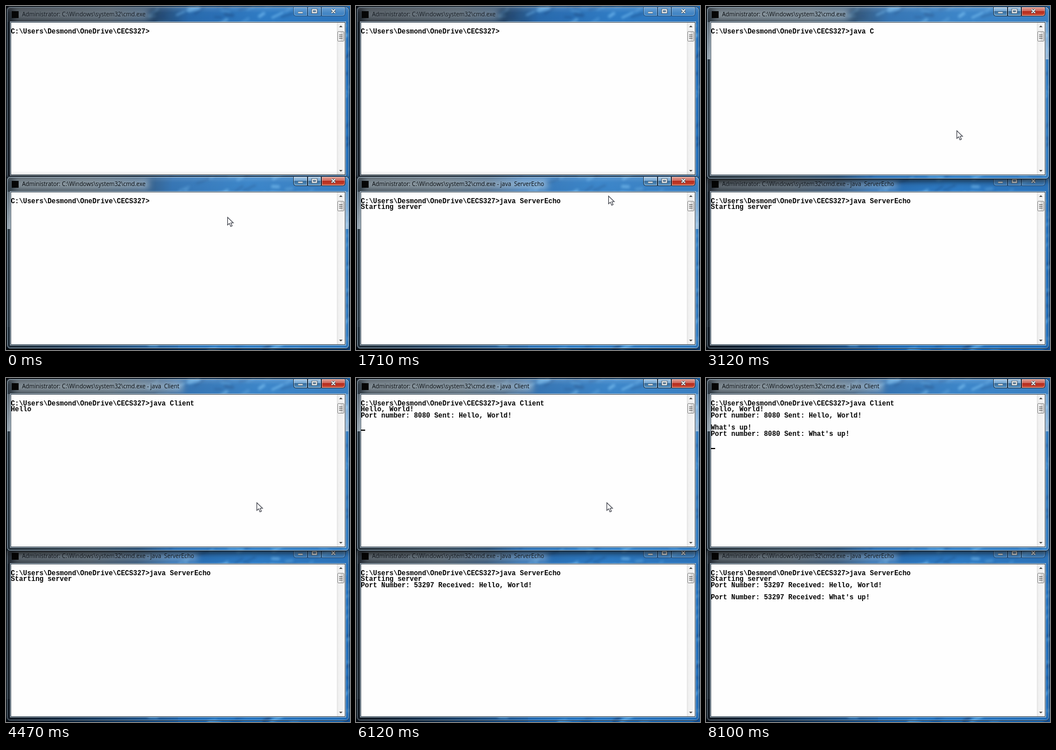
These frames come from a looping animation (600x600 px, 8.13 s). An HTML page with a canvas:

```html
<!DOCTYPE html>
<html lang="en">
<head>
<meta charset="utf-8">
<title>Echo server and client</title>
<style>
  html, body { margin: 0; width: 100%; height: 100%; overflow: hidden; background: #0b1a2c; }
  canvas { display: block; width: 600px; height: 600px; }
</style>
</head>
<body>
<canvas id="stage" width="600" height="600"></canvas>
<script>
const LOOP = 8130;
const ctx = document.getElementById('stage').getContext('2d');
const PROMPT = 'C:\\Users\\Desmond\\OneDrive\\CECS327>';
const TITLE = 'Administrator: C:\\Windows\\system32\\cmd.exe';
const CELL = 7.11, LINE = 10.67, OFFSET = 296;
const CLICK = 2160;

const clamp = v => Math.max(0, Math.min(1, v));
const typed = (t, from, to, s) => s.slice(0, Math.floor(clamp((t - from) / (to - from)) * s.length));

function gradient(c, x0, y0, x1, y1, stops) {
  const g = c.createLinearGradient(x0, y0, x1, y1);
  for (const [at, color] of stops) g.addColorStop(at, color);
  return g;
}

function roundPath(c, x, y, w, h, r) {
  c.beginPath();
  c.roundRect(x, y, w, h, r);
}

// Desktop picture: dark on the left, streaked blue on the right
function makeDesktop() {
  const cv = document.createElement('canvas');
  cv.width = cv.height = 600;
  const c = cv.getContext('2d');
  c.fillStyle = gradient(c, 0, 0, 600, 60, [
    [0, '#05080d'], [.12, '#12181e'], [.3, '#202d39'], [.43, '#0f3054'],
    [.53, '#1259a3'], [.75, '#196fc0'], [1, '#1766b4']]);
  c.fillRect(0, 0, 600, 600);
  c.fillStyle = gradient(c, 0, 585, 300, 585, [
    [0, '#03070c'], [.3, '#06192e'], [1, '#14589e']]);
  c.fillRect(0, 560, 300, 40);

  let seed = 71;
  const rnd = () => (seed = (seed * 16807) % 2147483647) / 2147483647;
  c.filter = 'blur(2px)';
  c.lineCap = 'round';
  for (let i = 0; i < 520; i++) {
    const x = 240 + rnd() * 380, y = rnd() * 600, len = 5 + rnd() * 16;
    const light = rnd() > .4;
    c.strokeStyle = light ? `rgba(115,195,250,${.2 + rnd() * .5})` : `rgba(3,45,105,${.3 + rnd() * .4})`;
    c.lineWidth = 2 + rnd() * 4;
    c.beginPath();
    c.moveTo(x, y);
    c.lineTo(x + len, y - len * (rnd() - .2));
    c.stroke();
  }
  return cv;
}
const desktop = makeDesktop();

function glass(dy, active) {
  ctx.save();
  if (active) {
    ctx.shadowColor = 'rgba(0,0,0,.8)';
    ctx.shadowBlur = 12;
    ctx.shadowOffsetY = 3;
  }
  roundPath(ctx, 1, 1, 598, 301, 6);
  ctx.fillStyle = '#12314f';
  ctx.fill();
  ctx.restore();

  ctx.save();
  roundPath(ctx, 1, 1, 598, 301, 6);
  ctx.clip();
  ctx.drawImage(desktop, 0, -dy);
  ctx.fillStyle = active ? 'rgba(150,195,225,.2)' : 'rgba(130,170,200,.1)';
  ctx.fillRect(0, 0, 600, 303);
  ctx.fillStyle = gradient(ctx, 0, 1, 0, 28, [
    [0, 'rgba(255,255,255,.2)'], [.4, 'rgba(255,255,255,.06)'], [1, 'rgba(255,255,255,.04)']]);
  ctx.fillRect(0, 0, 600, 28);
  if (active) {
    ctx.fillStyle = gradient(ctx, 0, 28, 0, 93, [
      [0, 'rgba(225,238,248,.3)'], [1, 'rgba(225,238,248,.6)']]);
    ctx.fillRect(0, 28, 8, 65);
    ctx.fillRect(592, 28, 8, 65);
  }
  ctx.restore();

  roundPath(ctx, 1.5, 1.5, 597, 300, 6);
  ctx.strokeStyle = active ? '#101820' : '#28343e';
  ctx.lineWidth = 1;
  ctx.stroke();
  roundPath(ctx, 2.5, 2.5, 595, 298, 5);
  ctx.strokeStyle = `rgba(215,238,255,${active ? .65 : .4})`;
  ctx.stroke();
}

function titleBar(text, active) {
  ctx.font = '10px "Open Sans", "Noto Sans", sans-serif';
  const w = ctx.measureText(text).width;
  ctx.save();
  ctx.beginPath();
  ctx.rect(3, 3, 497, 24);
  ctx.clip();
  ctx.filter = 'blur(6px)';
  ctx.fillStyle = `rgba(225,235,242,${active ? .5 : .36})`;
  ctx.fillRect(14, 6, w + 20, 18);
  ctx.restore();
  ctx.fillStyle = '#050505';
  ctx.fillRect(10, 9, 12, 12);
  ctx.fillStyle = active ? '#05090d' : '#141a20';
  ctx.fillText(text, 28, 18);
}

function buttons(active) {
  const tint = active
    ? [[0, 'rgba(225,238,248,.65)'], [.48, 'rgba(165,195,218,.5)'], [.5, 'rgba(45,85,120,.55)'], [1, 'rgba(120,175,210,.6)']]
    : [[0, 'rgba(205,228,245,.28)'], [1, 'rgba(135,185,220,.16)']];
  const red = [[0, '#e5aaa0'], [.46, '#cf675a'], [.5, '#b52a1c'], [.8, '#c2402c'], [1, '#e38b70']];
  const boxes = [[501, 25, [0, 0, 0, 4]], [526, 24, 0], [550, 42, [0, 0, 4, 0]]];
  boxes.forEach(([x, w, r], i) => {
    roundPath(ctx, x + .5, 1.5, w - 1, 16, r);
    ctx.fillStyle = gradient(ctx, 0, 1, 0, 18, active && i === 2 ? red : tint);
    ctx.fill();
    ctx.strokeStyle = active ? 'rgba(15,28,42,.8)' : 'rgba(20,40,62,.5)';
    ctx.lineWidth = 1;
    ctx.stroke();
    roundPath(ctx, x + 1.5, 2.5, w - 3, 14, r);
    ctx.strokeStyle = `rgba(255,255,255,${active ? .4 : .25})`;
    ctx.stroke();
  });

  const glyphs = new Path2D('M509.5 11.5h8M534.5 6.5h7v5h-7zM568 6l6 6M574 6l-6 6');
  for (const [color, width] of [['#3c4854', 3.6], ['#f6fafc', 1.8]]) {
    ctx.strokeStyle = color;
    ctx.lineWidth = width;
    ctx.stroke(glyphs);
  }
}

function triangle(x, y, d) {
  ctx.beginPath();
  ctx.moveTo(x - 3, y + d);
  ctx.lineTo(x + 3, y + d);
  ctx.lineTo(x, y - 2 * d);
  ctx.fill();
}

function scrollBar() {
  ctx.fillStyle = gradient(ctx, 577, 0, 591, 0, [[0, '#e4e4e4'], [.25, '#f1f1f1'], [1, '#f6f6f6']]);
  ctx.fillRect(577, 29, 14, 265);
  ctx.fillStyle = '#484848';
  triangle(584, 36, 1);
  triangle(584, 287, -1);
  roundPath(ctx, 578.5, 44.5, 11, 17, 1.5);
  ctx.fillStyle = gradient(ctx, 578, 0, 590, 0, [[0, '#f7f7f7'], [.5, '#e6e6e6'], [.52, '#d4d4d4'], [1, '#dcdcdc']]);
  ctx.fill();
  ctx.strokeStyle = '#909090';
  ctx.lineWidth = 1;
  ctx.stroke();
  ctx.fillStyle = '#555';
  for (const y of [50, 53, 56]) ctx.fillRect(581, y, 6, 1);
}

function consoleText(lines, caret) {
  ctx.font = 'bold 11.85px "Liberation Mono", "DejaVu Sans Mono", monospace';
  ctx.fillStyle = '#000';
  lines.forEach((line, row) => {
    [...line].forEach((ch, col) => ctx.fillText(ch, 8.5 + col * CELL, 47.7 + row * LINE));
  });
  if (caret) {
    const row = lines.length - 1;
    ctx.fillRect(8.5 + lines[row].length * CELL, Math.round(46.9 + row * LINE), 7.5, 2);
  }
}

function drawWindow(dy, win, active) {
  ctx.save();
  ctx.translate(0, dy);
  glass(dy, active);
  titleBar(win.title, active);
  buttons(active);
  ctx.fillStyle = 'rgba(220,236,248,.75)';
  ctx.fillRect(7, 27, 586, 269);
  ctx.fillStyle = '#35434f';
  ctx.fillRect(8, 28, 584, 267);
  ctx.fillStyle = '#fefefe';
  ctx.fillRect(9, 29, 582, 265);
  scrollBar();
  consoleText(win.lines, active && win.caret);
  ctx.restore();
}

function server(t) {
  const running = t >= 1380;
  const lines = [PROMPT + typed(t, 270, 1230, 'java ServerEcho')];
  if (running) lines.push('Starting server');
  if (t >= 5970) lines.push('Port Number: 53297 Received: Hello, World!', '');
  if (t >= 7590) lines.push('Port Number: 53297 Received: What\'s up!');
  return {
    title: TITLE + (running ? ' - java  ServerEcho' : ''),
    lines,
    caret: (t + 1010) % 1060 < 530
  };
}

function client(t) {
  const running = t >= 3780;
  const lines = [PROMPT + typed(t, 2500, 3620, 'java Client')];
  if (running) lines.push(typed(t, 4000, 4400, 'Hello') + typed(t, 4740, 5780, ', World!'));
  if (t >= 5970) {
    lines.push('Port number: 8080 Sent: Hello, World!', '',
      typed(t, 6300, 6900, 'What\'s ') + typed(t, 7020, 7330, 'up!'));
  }
  if (t >= 7590) lines.push('Port number: 8080 Sent: What\'s up!', '', '');
  return {
    title: TITLE + (running ? ' - java  Client' : ''),
    lines,
    caret: (t + 610) % 1060 < 530
  };
}

// Pointer stops: time, x, y
const stops = [[1410, 386, 368], [1700, 440, 331], [1760, 440, 331], [2080, 437, 217]];
const arrow = new Path2D('M0 0V13.5L3.2 10.6L5.5 16L8 15L5.7 9.8H10Z');

function pointer(t) {
  if (t >= 7890) return;
  let [, x, y] = stops[0];
  for (let i = 1; i < stops.length; i++) {
    const [t0, x0, y0] = stops[i - 1], [t1, x1, y1] = stops[i];
    if (t < t0) break;
    const k = clamp((t - t0) / (t1 - t0)), e = k * k * (3 - 2 * k);
    x = x0 + (x1 - x0) * e;
    y = y0 + (y1 - y0) * e;
  }
  ctx.save();
  ctx.translate(Math.round(x) + .5, Math.round(y) + .5);
  ctx.fillStyle = '#fff';
  ctx.strokeStyle = '#3c3f48';
  ctx.lineWidth = 1.1;
  ctx.fill(arrow);
  ctx.stroke(arrow);
  ctx.restore();
}

function draw(t) {
  ctx.drawImage(desktop, 0, 0);
  const topActive = t >= CLICK;
  const top = () => drawWindow(0, client(t), topActive);
  const bottom = () => drawWindow(OFFSET, server(t), !topActive);
  for (const paint of topActive ? [bottom, top] : [top, bottom]) paint();
  pointer(t);
}

const start = performance.now();
function tick() {
  const t = (performance.now() - start) % LOOP;
  draw(Math.floor(t / 30) * 30);
  requestAnimationFrame(tick);
}
tick();
</script>
</body>
</html>
```
